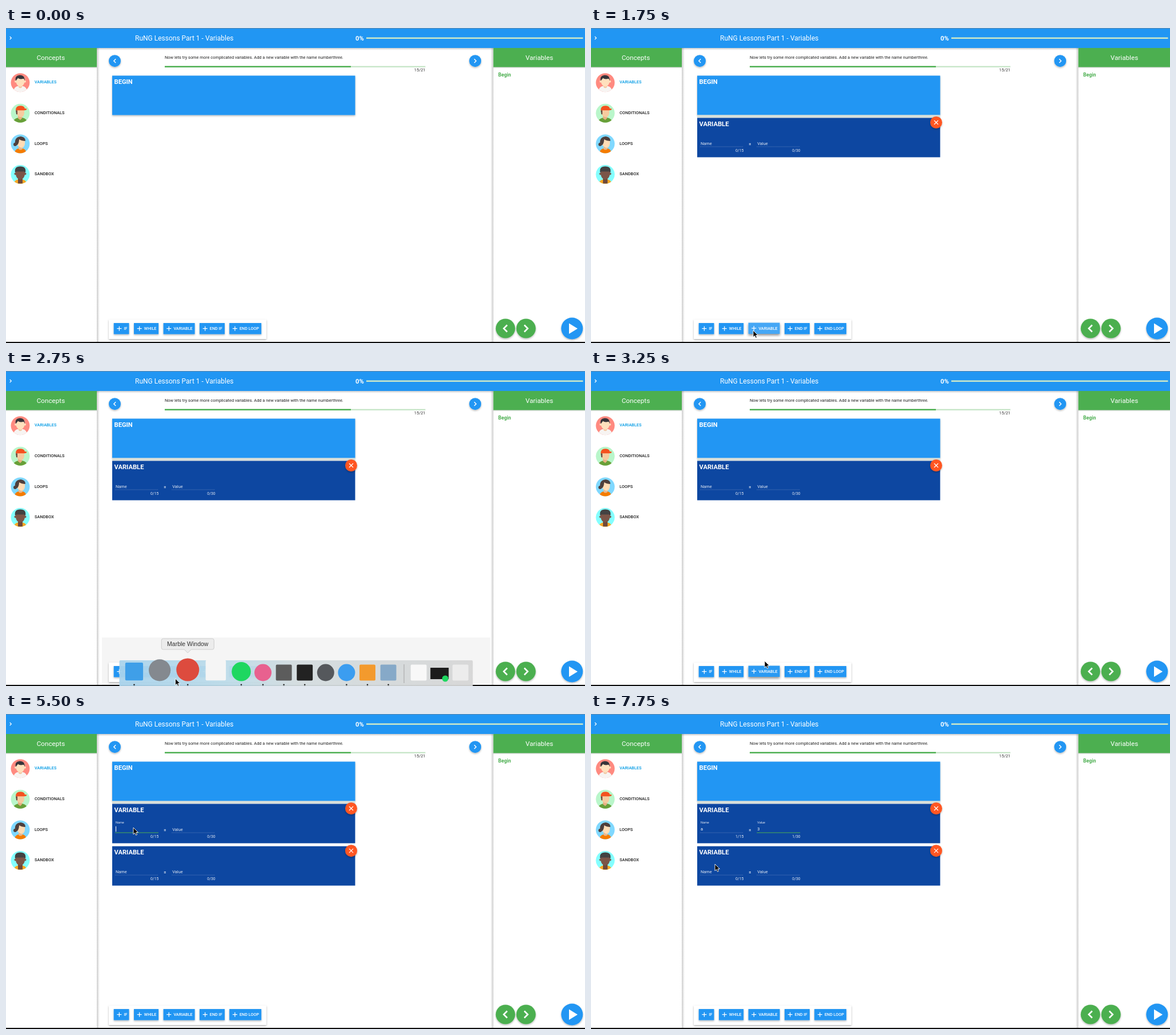
Recreate the animation shown at these times as an HTML page. Size 1014 by 552 pixels, loop 8 s.

```html
<!DOCTYPE html>
<html lang="en">
<head>
<meta charset="utf-8">
<title>Variables lesson</title>
<style>
  html, body { margin: 0; width: 100%; height: 100%; overflow: hidden; background: #fff; }
  svg { display: block; width: 100%; height: 100%; font-family: Roboto, "Liberation Sans", sans-serif; }
</style>
</head>
<body>
<svg viewBox="0 0 1014 552" xmlns="http://www.w3.org/2000/svg">
  <defs>
    <filter id="soft" x="-20%" y="-30%" width="140%" height="170%">
      <feDropShadow dx="0" dy="1.5" stdDeviation="1.7" flood-opacity=".3"/>
    </filter>
    <filter id="raised" x="-20%" y="-40%" width="140%" height="200%">
      <feDropShadow dx="0" dy="2.5" stdDeviation="2.2" flood-opacity=".45"/>
    </filter>
    <linearGradient id="down" x2="0" y2="1">
      <stop stop-opacity=".2"/><stop offset="1" stop-opacity="0"/>
    </linearGradient>
    <linearGradient id="right">
      <stop stop-opacity=".2"/><stop offset="1" stop-opacity="0"/>
    </linearGradient>
    <linearGradient id="left">
      <stop stop-opacity="0"/><stop offset="1" stop-opacity=".2"/>
    </linearGradient>
    <linearGradient id="glass">
      <stop stop-color="#a9d3ec"/><stop offset=".3" stop-color="#bcdbe9"/>
      <stop offset=".5" stop-color="#d3dcdf"/><stop offset="1" stop-color="#d6d6d6"/>
    </linearGradient>
    <clipPath id="disc"><circle r="16.5"/></clipPath>
  </defs>
  <g id="page"></g>
  <g id="live"></g>
</svg>
<script>
const STEP = 250, LOOP = 8000;
const BLUE = '#2196f3', NAVY = '#0d47a1', GREEN = '#4caf50', PALE = '#c8e6c9';
const page = document.getElementById('page');
const live = document.getElementById('live');

const rect = (x, y, w, h, fill, more = '') =>
  `<rect x="${x}" y="${y}" width="${w}" height="${h}" fill="${fill}" ${more}/>`;
const circle = (x, y, r, fill, more = '') =>
  `<circle cx="${x}" cy="${y}" r="${r}" fill="${fill}" ${more}/>`;
const path = (d, fill, more = '') => `<path d="${d}" fill="${fill}" ${more}/>`;
const line = (d, color, width, more = '') =>
  path(d, 'none', `stroke="${color}" stroke-width="${width}" ${more}`);
const text = (s, x, y, size, fill = '#fff', more = '') =>
  `<text x="${x}" y="${y}" font-size="${size}" fill="${fill}" ${more}>${s}</text>`;
const move = (x, y, inner, more = '') => `<g transform="translate(${x} ${y})" ${more}>${inner}</g>`;

const SOFT = 'filter="url(#soft)"', BOLD = 'font-weight="700"', MEDIUM = 'font-weight="500"';
const MIDDLE = 'text-anchor="middle"', END = 'text-anchor="end"';

// dir is 1 for a chevron pointing right, -1 for left
const chevron = (x, y, s, dir, width) =>
  line(`M${x - dir * s / 2} ${y - s}l${dir * s} ${s}l${-dir * s} ${s}`, '#fff', width);
const roundButton = (x, y, r, fill, dir, s, width) =>
  circle(x, y, r, fill, SOFT) + chevron(x, y, s, dir, width);

const avatars = [
  circle(0, 0, 17, '#ff8a80') +
  path('M-13 17Q-11 7-4 6H4Q11 7 13 17Z', '#f7f4f2') +
  path('M-3 2H3V8Q0 11-3 8Z', '#f2c9a6') +
  circle(-8, -2, 2, '#ffe0bd') + circle(8, -2, 2, '#ffe0bd') +
  path('M-7.500-9H7.500V-1Q6 6 0 7Q-6 6-7.500-1Z', '#ffe0bd') +
  path('M-8-3Q-10-12-2-13Q8-14 8-3L6-7Q-1-5-4-8Z', '#37353a'),
  circle(0, 0, 17, '#b9f6ca') +
  path('M-14 17Q-11 9-4 8H4Q11 9 13 17Z', '#689f38') +
  path('M-4 2H3V9L0 12L-4 9Z', '#e8b183') +
  path('M-7-6H7V0Q6 7 1 7Q-6 6-7-1Z', '#f6cb9f') +
  path('M-8-5H-5V2H-7Z', '#6d4c41') +
  path('M-8-5Q-8-13 0-13Q7-13 8-8H11Q12-5 7-5Z', '#f4511e'),
  circle(0, 0, 17, '#80d8ff') +
  path('M-11 17Q-9 9-3 8H4Q10 9 11 17Z', '#f57c00') +
  path('M-3 2H4V9Q0 12-3 9Z', '#e8b98f') +
  path('M-6-9H8V0Q7 7 2 7Q-5 5-6-1Z', '#ffdcb5') +
  path('M-9 1Q-11-12 1-13Q9-12 9-5Q2-5-2-8Q-2-2-5 2Z', '#4e3f3c') +
  circle(-9, 1, 3, '#4e3f3c'),
  circle(0, 0, 17, '#84ffff') +
  path('M-12 17Q-10 10-4 9H4Q10 10 12 17Z', '#f9a825') +
  path('M-4 3H4V16H-4Z', '#6d4a3d') +
  circle(-8.500, -1, 2, '#7b5548') + circle(8.500, -1, 2, '#7b5548') +
  path('M-8-8H8V0Q7 8 0 9Q-7 8-8 0Z', '#7b5548') +
  path('M-9-3Q-11-14 0-14Q11-14 9-3L7-5H-7Z', '#424242')
];

function drawPage() {
  const menu = ['VARIABLES', 'CONDITIONALS', 'LOOPS', 'SANDBOX'].map((name, i) => {
    const y = 95.7 + 53.6 * i;
    return move(25, y, `<g clip-path="url(#disc)">${avatars[i]}</g>`) +
      text(name, 50, y + 1.700, 7.4, i ? '#212121' : '#039be5', MEDIUM);
  }).join('');

  page.innerHTML =
    rect(159, 35, 5, 515, 'url(#right)') + rect(848.5, 35, 5, 515, 'url(#left)') +
    rect(159, 35, 694.5, 4, 'url(#down)') +
    rect(0, 68, 159, 3, 'url(#down)') + rect(853.5, 68, 161, 3, 'url(#down)') +
    rect(0, 0, 1014, 35, BLUE) + rect(0, 0, 1014, 1, '#5c88ac') +
    rect(0, 35, 159, 33.5, GREEN) + rect(853.5, 35, 161, 33.5, GREEN) +
    chevron(8, 17.5, 2.6, 1, 1.3) +
    text('RuNG Lessons Part 1 - Variables', 226, 22, 12) +
    text('0%', 612, 22, 11.3, '#fff', BOLD) +
    rect(631, 16.4, 379.5, 2.6, PALE) +
    text('Concepts', 78.5, 56, 11.7, '#fff', MIDDLE) +
    text('Variables', 934, 56, 11.7, '#fff', MIDDLE) +
    menu +
    text('Begin', 862, 85, 8.7, GREEN, BOLD) +
    roundButton(190.5, 57.7, 10.5, BLUE, -1, 3.4, 1.4) +
    roundButton(821.7, 57.7, 10.5, BLUE, 1, 3.4, 1.4) +
    text('Now lets try some more complicated variables. Add a new variable with the name numberthree.',
      278, 53.7, 7.41, '#212121') +
    rect(278, 66.6, 456.5, 2.4, PALE) + rect(278, 66.6, 326, 2.4, GREEN) +
    text('15/21', 734.5, 76.2, 7.4, '#333', END) +
    roundButton(874.7, 526.5, 17, GREEN, -1, 6, 2.6) +
    roundButton(910.7, 526.5, 17, GREEN, 1, 6, 2.6) +
    circle(991.3, 526.5, 19, BLUE, SOFT) + path('M986 517.500V536L1001 526.700Z', '#fff') +
    rect(186, 83.5, 425.5, 69, BLUE, SOFT) +
    text('BEGIN', 189.5, 98, 11.2, '#fff', BOLD) +
    rect(0, 550, 1014, 2, '#0c0c0c');
}

// One labelled input; up runs from 0 (resting label) to 1 (floated label)
function field(x, label, limit, { up = 0, value = '', focus = false, caret = false } = {}) {
  const caretX = x + 0.5 + (value ? 5 : 0);
  return text(label, x, 47.3 - 12.8 * up, 7.4 - 1.9 * up, '#e4eaf4') +
    text(value, x, 46.5, 7.4) +
    line(`M${x - 1} 50.500h76`, focus ? GREEN : '#6c8cc4', focus ? 1 : 0.8,
      focus ? '' : 'stroke-dasharray="1 1"') +
    (caret ? line(`M${caretX} 39.300v9.500`, '#fff', 1) : '') +
    text(`${value.length}/${limit}`, x + 75.3, 59.5, 6.8, '#e4eaf4', END);
}

const block = (y, opacity, name, value) => move(0, y,
  rect(186, 0, 425.5, 69, NAVY) +
  text('VARIABLE', 189.5, 14.7, 11.2, '#fff', BOLD) +
  field(192, 'Name', 15, name) +
  text('=', 276.3, 48, 7.4, '#fff', BOLD) +
  field(291.3, 'Value', 30, value) +
  circle(604.5, 8, 10.5, '#ff5722', SOFT) +
  line('M601 4.500l7 7m0-7l-7 7', '#fff', 1.2), `opacity="${opacity}"`);

function toolbar(hover) {
  const buttons = [['IF', 188.7, 26.8], ['WHILE', 224, 43.2], ['VARIABLE', 275.6, 55],
    ['END IF', 339, 44], ['END LOOP', 391.2, 56]];
  return rect(180, 511, 276, 34, '#fff', SOFT) + buttons.map(([name, x, w]) => {
    const lit = name === 'VARIABLE' && hover;
    const y = lit ? 516.5 : 517;
    return rect(x, y, w, 19.5, lit || BLUE, lit ? 'filter="url(#raised)"' : SOFT) +
      line(`M${x + 5.700} ${y + 9.700}h8m-4-4v8`, '#fff', 1.2) +
      text(name, x + 17.8, y + 12, 7.25, '#fff', MEDIUM);
  }).join('');
}

// Icons: slot, colour, round or square, running dot
const icons = [
  [0, '#3f9fe8', 0, 1], [1, '#84898f', 1, 0], [2, '#dd4b3e', 1, 1], [3, '#f5f5f5', 0, 0],
  [4, '#1ed760', 1, 1], [5, '#e8618f', 1, 1], [6, '#5c5c5c', 0, 1], [7, '#222', 0, 1],
  [8, '#55585c', 1, 0], [9, '#3b9df0', 1, 1], [10, '#f39a2d', 0, 1], [11, '#86a9c8', 0, 1],
  [12.45, '#f8f8f8', 0, 0], [13.45, '#1c1c1c', 0, 0], [14.45, '#ececec', 0, 0]
];

// Icons swell around the pointer and push their neighbours outward
function dock(zoom, drop) {
  const half = 288 + 21.5 * zoom;
  const place = slot => {
    const x = 245 + 36.6 * slot;
    const a = Math.max(-1, Math.min(1, (x - 318) / 95)) * Math.PI / 2;
    return [x + 22 * zoom * Math.sin(a), 30 + 10 * zoom * Math.cos(a)];
  };
  const shapes = icons.map(([slot, fill, round, running]) => {
    const [x, size] = place(slot), y = 543.5 - size / 2, s = size * 0.93;
    const wide = slot === 13.45;
    const shape = wide ? rect(x - 16, 520, 32, 20, fill) + circle(x + 10, 539, 5.5, '#1ed760')
      : round ? circle(x, y, size / 2, fill)
      : rect(x - s / 2, y - s / 2, s, s, fill, 'rx="2"');
    return shape + (running ? circle(x, 549.7, 1.3, '#222') : '');
  }).join('');
  const [tipX, tipSize] = place(2), tipY = 509 - tipSize;
  const tip = drop ? '' : move(tipX, tipY,
    path('M-43-0H43Q46 0 46 3V16Q46 19 43 19H6L0 25L-6 19H-43Q-46 19-46 16V3Q-46 0-43 0Z',
      '#ececec', 'stroke="#c6c6c6" stroke-width=".8"') +
    text('Marble Window', 0, 13.2, 10.5, '#333',
      `${MIDDLE} font-family="Liberation Sans, Arial, sans-serif"`));
  return move(0, drop,
    rect(508 - half, 507, 2 * half, 46, 'url(#glass)', 'fill-opacity=".95" rx="2"') +
    line(`M${place(11.75)[0]} 514v33`, '#a5a5a5', 1) + shapes + tip);
}

const pointer = (x, y) => move(x, y, path(
  'M0 0V11.800L2.700 9.300L4.500 13.300L6.500 12.400L4.800 8.500H8.400Z', '#000',
  'stroke="#fff" stroke-width=".9"'));

// Pointer stops: step, x, y; a stop without a place hides it
const stops = [[0], [1, 367, 286], [2, 266, 469], [4, 274, 500], [5, 284, 530], [8, 262, 360],
  [9, 250, 242], [10, 288, 534], [11, 296.5, 539], [12, 300, 527], [13, 304, 508], [14, 304, 525],
  [19, 330, 430], [20, 349, 300], [21, 223, 199], [26], [31, 217, 263]];

// 0 before a step, one half on it, 1 after
const arrive = (step, at) => step < at ? 0 : step === at ? 0.5 : 1;
const within = (step, from, to) => step >= from && step < to;

function draw(step) {
  let out = '';
  const docked = within(step, 10, 13);
  if (docked) out += rect(168, 467, 680, 83, '#f5f5f5');

  const first = arrive(step, 6), second = arrive(step, 15);
  if (first) {
    out += rect(186, 152.5, 425.5, 5, '#d9dfd9', `opacity="${first}"`);
    out += block(157.5, first, {
      up: arrive(step, 21),
      value: step >= 26 ? 'a' : '',
      focus: within(step, 21, 28),
      caret: within(step, 22, 24) || within(step, 26, 28)
    }, {
      up: arrive(step, 28),
      value: step >= 30 ? '3' : '',
      focus: step >= 28,
      caret: within(step, 29, 31)
    });
  }
  if (second) out += block(231.7, second);

  const pressed = within(step, 6, 8) || within(step, 15, 19);
  const over = step === 5 || within(step, 13, 15);
  out += toolbar(pressed ? '#45a7f5' : over ? '#2b9af3' : '');

  if (docked) out += dock(step === 10 ? 0.6 : step === 11 ? 1 : 1.9, step === 10 ? 20 : 0);
  out += rect(0, 550, docked ? 180 : 1014, 2, '#0c0c0c');

  const [, x, y] = stops.filter(s => s[0] <= step).pop();
  if (x) out += pointer(x, y);
  live.innerHTML = out;
}

let shown = -1;
function tick() {
  const step = Math.floor(performance.now() % LOOP / STEP);
  if (step !== shown) draw(shown = step);
  requestAnimationFrame(tick);
}
drawPage();
tick();
</script>
</body>
</html>
```
